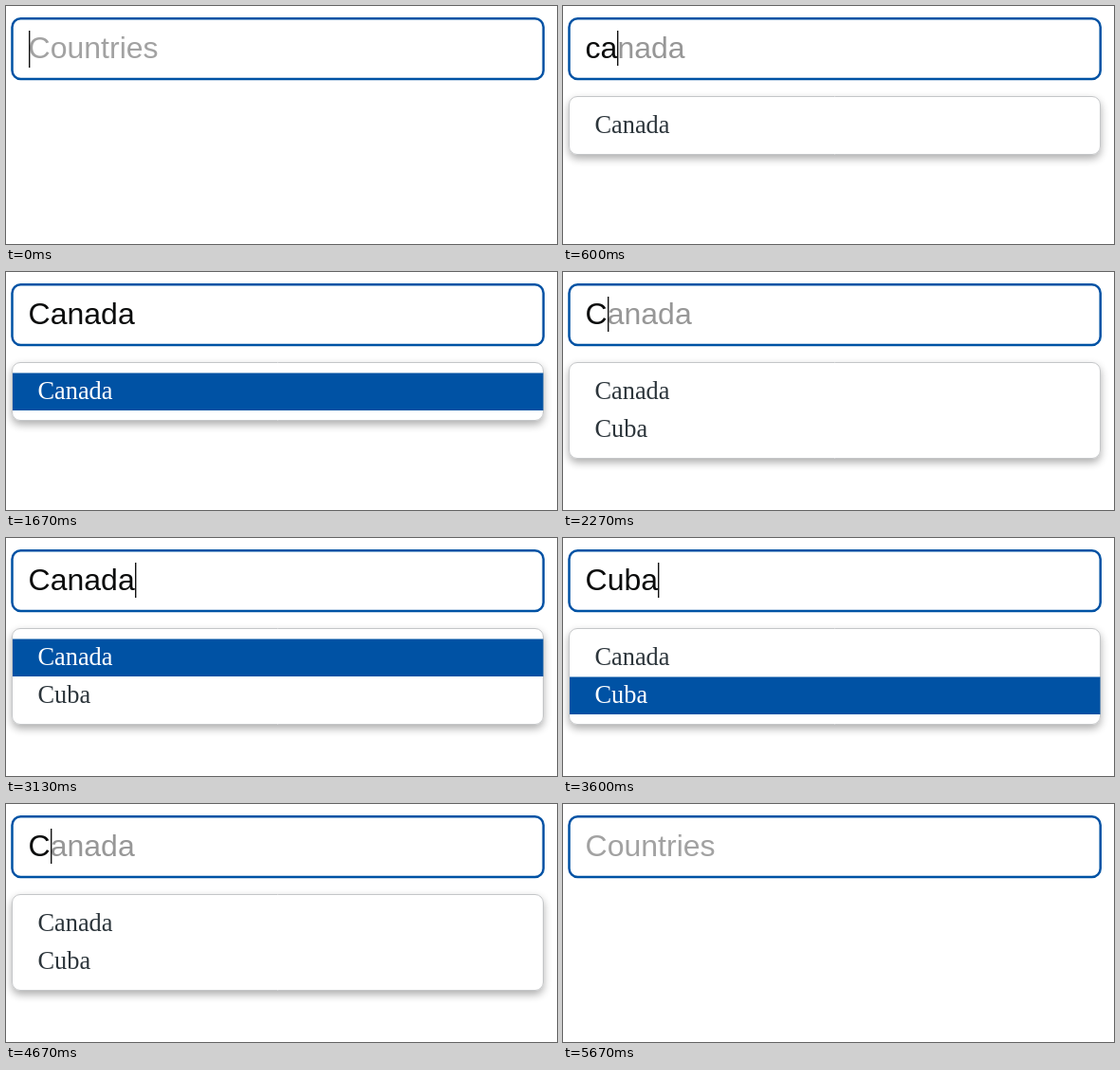
Write an HTML page with a canvas that moves like this. It is 581 by 251 pixels and loops after 5870 ms.

```html
<!DOCTYPE html>
<html lang="en">
<head>
<meta charset="utf-8">
<title>Country autocomplete</title>
<style>
html, body { margin: 0; width: 100%; height: 100%; overflow: hidden; background: #fff; }
canvas { display: block; width: 581px; height: 251px; }
</style>
</head>
<body>
<canvas id="stage"></canvas>
<script>
const W = 581, H = 251, LOOP = 5870;
const BLUE = '#0052a4';
const INPUT_FONT = '32px "Liberation Sans", Arial, sans-serif';
const ITEM_FONT = '26.4px "Liberation Serif", "Times New Roman", serif';
const TEXT_X = 23.6, ROW = 40, PANEL_TOP = 95;
const COUNTRIES = ['Canada', 'Cuba'];

// [start in ms, typed query, picked row or -1, caret visible]
const STEPS = [
  [0, '', -1, true],
  [400, 'c', -1, true],
  [600, 'ca', -1, true],
  [1200, 'ca', 0, true],
  [1670, 'ca', 0, false],
  [1800, 'Canad', -1, true],
  [1930, 'Cana', -1, true],
  [2070, 'Can', -1, true],
  [2170, 'Ca', -1, true],
  [2270, 'C', -1, true],
  [2870, 'C', -1, false],
  [3000, 'C', 0, true],
  [3270, 'C', 1, true],
  [3870, 'C', 1, false],
  [4070, 'Cub', -1, true],
  [4200, 'Cu', -1, true],
  [4470, 'C', -1, true],
  [4800, '', -1, true],
  [5270, '', -1, false]
];

const canvas = document.getElementById('stage');
const ctx = canvas.getContext('2d');
const dpr = window.devicePixelRatio || 1;
canvas.width = W * dpr;
canvas.height = H * dpr;
ctx.scale(dpr, dpr);

function roundBox(x, y, w, h, r) {
  ctx.beginPath();
  ctx.roundRect(x, y, w, h, r);
}

function label(text, x, y, color, font) {
  ctx.font = font;
  ctx.fillStyle = color;
  ctx.fillText(text, x, y);
  return ctx.measureText(text).width;
}

function drawInput(text, hint, caret) {
  roundBox(6.5, 13.2, 560.2, 63.8, 9);
  ctx.strokeStyle = BLUE;
  ctx.lineWidth = 2.5;
  ctx.stroke();

  const width = label(text, TEXT_X, 54.5, '#0b0c0c', INPUT_FONT);
  if (hint) label(hint, TEXT_X + width, 54.5, '#979797', INPUT_FONT);
  if (!text) label('Countries', TEXT_X, 54.5, '#a2a2a2', INPUT_FONT);
  if (caret) {
    ctx.fillStyle = '#111';
    ctx.fillRect(Math.round(TEXT_X + width), 26, 1.4, text ? 37 : 39);
  }
}

function drawPanel(items, pick) {
  const height = 22 + ROW * items.length;
  roundBox(6, PANEL_TOP, 561, height, 9);
  ctx.save();
  ctx.shadowColor = 'rgba(0, 0, 0, 0.32)';
  ctx.shadowBlur = 8 * dpr;
  ctx.shadowOffsetY = 4 * dpr;
  ctx.fillStyle = '#fff';
  ctx.fill();
  ctx.restore();

  roundBox(6.5, PANEL_TOP + 0.5, 560, height - 1, 8.5);
  ctx.strokeStyle = '#c4c6c8';
  ctx.lineWidth = 1;
  ctx.stroke();

  items.forEach((name, i) => {
    const active = i === pick;
    if (active) {
      ctx.fillStyle = BLUE;
      ctx.fillRect(7, 106.5 + ROW * i, 559.5, 39.5);
    }
    label(name, 33.4, 134.3 + ROW * i, active ? '#fff' : '#2c353b', ITEM_FONT);
  });
}

function draw(time) {
  const t = time % LOOP;
  const [, query, pick, caret] = STEPS.findLast(step => step[0] <= t);
  const items = query
    ? COUNTRIES.filter(c => c.toLowerCase().startsWith(query.toLowerCase()))
    : [];
  const text = pick < 0 ? query : items[pick];
  const hint = pick < 0 && items.length ? items[0].slice(query.length) : '';

  ctx.fillStyle = '#fff';
  ctx.fillRect(0, 0, W, H);
  drawInput(text, hint, caret);
  if (items.length) drawPanel(items, pick);
}

const start = performance.now();
function tick() {
  draw(performance.now() - start);
  requestAnimationFrame(tick);
}
tick();
</script>
</body>
</html>
```
